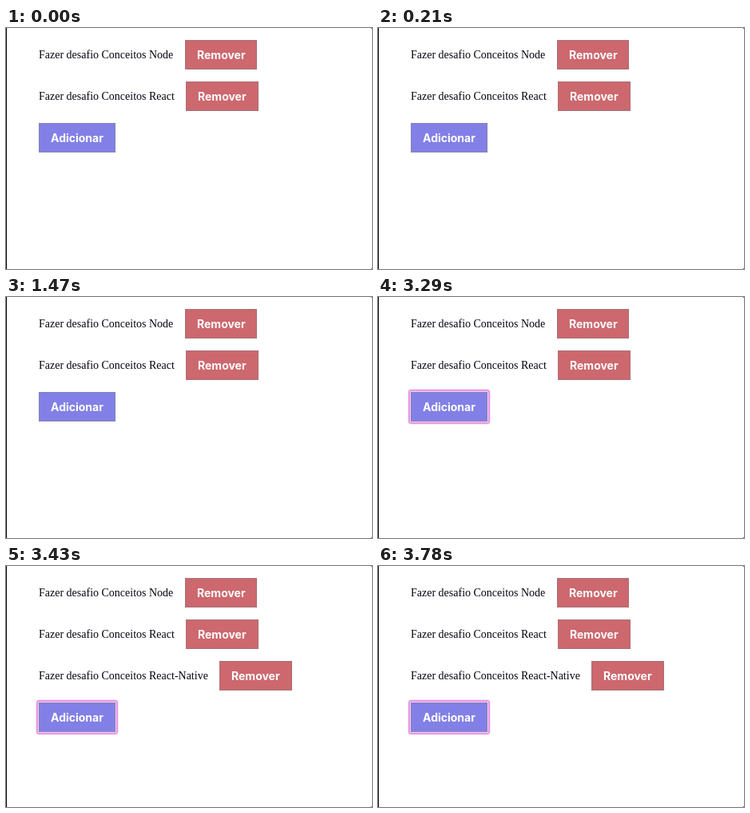
These frames come from a looping animation (458 px wide and 302 px high, 4760 ms). An HTML page with a canvas:

```html
<!DOCTYPE html>
<html lang="pt-BR">
<head>
<meta charset="utf-8">
<title>Lista de desafios</title>
<style>
  html, body { margin: 0; width: 100%; height: 100%; overflow: hidden; background: #fff; }
  canvas { display: block; width: 458px; height: 302px; }
</style>
</head>
<body>
<canvas id="stage"></canvas>
<script>
const W = 458, H = 302, LOOP = 4760;
const FOCUS_AT = 3220, ADD_AT = 3430;
const ROW_TOP = 15, ROW_STEP = 52, LEFT = 41;

const tasks = [
  { text: 'Fazer desafio Conceitos Node', x: 224, w: 90 },
  { text: 'Fazer desafio Conceitos React', x: 225, w: 91 },
  { text: 'Fazer desafio Conceitos React-Native', x: 267, w: 91 }
];

const canvas = document.getElementById('stage');
const ctx = canvas.getContext('2d');
const ratio = window.devicePixelRatio || 1;
canvas.width = W * ratio;
canvas.height = H * ratio;
ctx.scale(ratio, ratio);

function label(text, x, y, font, color) {
  ctx.font = font;
  ctx.fillStyle = color;
  ctx.fillText(text, x, y);
}

function button(text, x, y, w, fill, edge) {
  ctx.fillStyle = fill;
  ctx.fillRect(x, y, w, 37);
  ctx.strokeStyle = edge;
  ctx.lineWidth = 1;
  ctx.strokeRect(x + 0.5, y + 0.5, w - 1, 36);
  label(text, x + 15, y + 24, '700 14px Inter, Roboto, sans-serif', '#fff');
}

function ring(x, y, w, h, grow, width, color) {
  ctx.beginPath();
  ctx.roundRect(x - grow, y - grow, w + 2 * grow, h + 2 * grow, grow);
  ctx.lineWidth = width;
  ctx.strokeStyle = color;
  ctx.stroke();
}

function frame() {
  const t = performance.now() % LOOP;
  const count = t < ADD_AT ? 2 : 3;

  ctx.fillStyle = '#fff';
  ctx.fillRect(0, 0, W, H);
  ctx.fillStyle = '#000';
  ctx.fillRect(0, 0, 1, H);
  ctx.fillStyle = '#555';
  ctx.fillRect(W - 1, 0, 1, 1);
  ctx.fillRect(W - 1, H - 1, 1, 1);

  tasks.slice(0, count).forEach((task, i) => {
    const y = ROW_TOP + i * ROW_STEP;
    label(task.text, LEFT, y + 23, '14px "Liberation Serif", serif', '#050510');
    button('Remover', task.x, y, task.w, '#cc686e', '#a87078');
  });

  const y = ROW_TOP + count * ROW_STEP;
  button('Adicionar', LEFT, y, 96, '#8280e6', '#8482b4');
  if (t >= FOCUS_AT) {
    ring(LEFT, y, 96, 37, 0.5, 1, '#f6d2f6');
    ring(LEFT, y, 96, 37, 2, 2, '#e694e2');
    ring(LEFT, y, 96, 37, 3.3, 0.7, '#f3cdf1');
  }
  requestAnimationFrame(frame);
}
requestAnimationFrame(frame);
</script>
</body>
</html>
```
